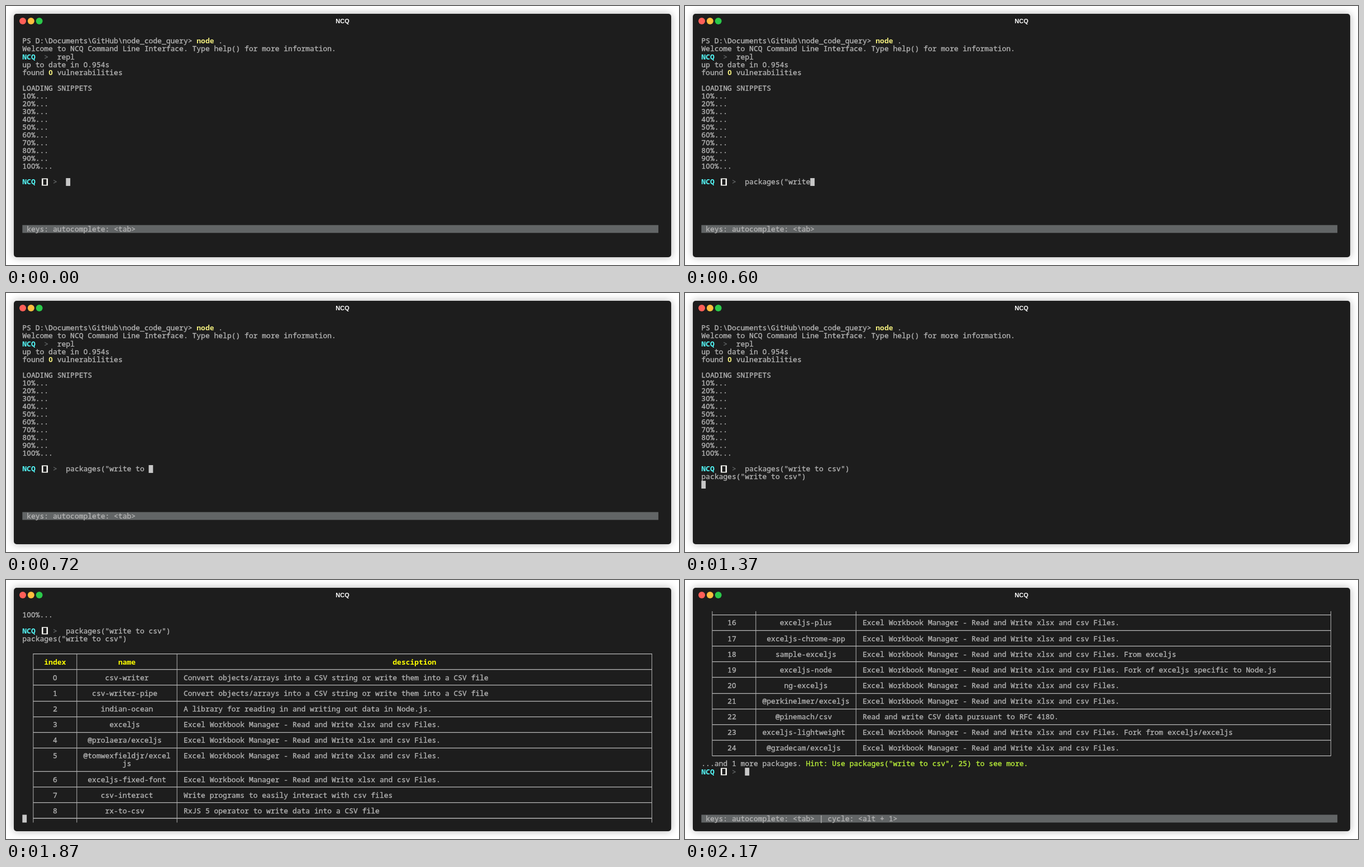
An HTML page with a canvas for the animation above (4.17 s loop, 1205 by 465 pixels).

```html
<!DOCTYPE html>
<html lang="en">
<head>
<meta charset="utf-8">
<title>NCQ</title>
<style>
html, body { margin: 0; width: 100%; height: 100%; overflow: hidden; background: #fff; }
#window {
  position: absolute; left: 14px; top: 14px; width: 1177px; height: 437px;
  border-radius: 5px; background: #1d1d1d; box-shadow: 0 0 14px rgba(0, 0, 0, .3);
}
canvas { position: absolute; left: 0; top: 0; }
</style>
</head>
<body>
<div id="window"></div>
<canvas id="screen" width="1205" height="465"></canvas>
<script>
const ctx = document.getElementById('screen').getContext('2d');
const LOOP = 4170, LEFT = 29.3, TOP = 56, CELL = 7.8, LINE = 14.055, COLS = 146;
const BG = '#1d1d1d', FG = '#b4b4b4', DIM = '#626566', CYAN = '#5ff', PALE = '#f2ee7e',
      YELLOW = '#ff0', GREEN = '#b9f03a', WHITE = '#f9f9f4', CURSOR = '#c7c7c7';
const COMMAND = 'packages("write to csv")';
const EXCEL = 'Excel Workbook Manager - Read and Write xlsx and csv Files.';
const CONVERT = 'Convert objects/arrays into a CSV string or write them into a CSV file';
const BORDERS = [2, 12, 35, 144];

const firstRows = [
  ['csv-writer', CONVERT],
  ['csv-writer-pipe', CONVERT],
  ['indian-ocean', 'A library for reading in and writing out data in Node.js.'],
  ['exceljs', EXCEL],
  ['@prolaera/exceljs', EXCEL],
  ['@tomwexfieldjr/exceljs', EXCEL],
  ['exceljs-fixed-font', EXCEL],
  ['csv-interact', 'Write programs to easily interact with csv files'],
  ['rx-to-csv', 'RxJS 5 operator to write data into a CSV file'],
];
const lastRows = [
  ['exceljs2', EXCEL.replace('Manager', 'Manager (forked)')],
  ['exceljs-rtl', EXCEL],
  ['exceljs-plus', EXCEL],
  ['exceljs-chrome-app', EXCEL],
  ['sample-exceljs', EXCEL + ' From exceljs'],
  ['exceljs-node', EXCEL + ' Fork of exceljs specific to Node.js'],
  ['ng-exceljs', EXCEL],
  ['@perkinelmer/exceljs', EXCEL],
  ['@pinemach/csv', 'Read and write CSV data pursuant to RFC 4180.'],
  ['exceljs-lightweight', EXCEL + ' Fork from exceljs/exceljs'],
  ['@gradecam/exceljs', EXCEL],
];

const colX = col => LEFT + col * CELL;
const rowY = row => TOP + row * LINE;
const ruleY = row => Math.floor(rowY(row) + 6.5);

function text(row, col, string, color = FG, bold = false) {
  ctx.fillStyle = ctx.strokeStyle = color;
  ctx.lineWidth = .35;
  ctx.textAlign = 'center';
  [...string].forEach((char, i) => {
    // The proportional face has a plain zero
    const family = char === '0' ? '"Noto Sans", sans-serif' : '"Noto Sans Mono", monospace';
    const x = colX(col + i + .5), y = Math.round(rowY(row) + 11.4);
    ctx.font = `${bold ? 'bold ' : ''}13px ${family}`;
    ctx.fillText(char, x, y);
    if (!bold) ctx.strokeText(char, x, y); // slightly heavier stems
  });
}

function block(row, col, width, color) {
  ctx.fillStyle = color;
  ctx.fillRect(colX(col), rowY(row), width * CELL, LINE);
}

const cursor = (row, col) => block(row, col, 1, CURSOR);

// The bold brackets touch and read as one closed box
function brackets(row) {
  const y = Math.round(rowY(row));
  ctx.fillStyle = WHITE;
  ctx.fillRect(64, y + .5, 11, 13);
  ctx.fillStyle = BG;
  ctx.fillRect(66.5, y + 2, 6, 10);
}

function prompt(row, input = '') {
  text(row, 0, 'NCQ', CYAN, true);
  brackets(row);
  text(row, 7, '>', DIM);
  text(row, 10, input);
}

function keyBar(row, keys) {
  block(row, 0, COLS, DIM);
  text(row, 0, ' keys: ' + keys);
}

function rule(row) {
  ctx.fillStyle = FG;
  ctx.fillRect(colX(2.5), ruleY(row), 142 * CELL, 1.3);
}

function verticals(top, bottom) {
  ctx.fillStyle = FG;
  for (const col of BORDERS) ctx.fillRect(colX(col + .5) - .5, top, 1, bottom - top);
}

function centered(row, left, width, string, color, bold) {
  text(row, left + Math.floor((width - string.length) / 2), string, color, bold);
}

// Draws table rows with a rule below each; returns the next free row
function tableRows(row, rows, index) {
  for (const [name, description] of rows) {
    centered(row, 3, 9, String(index++));
    text(row, 37, description);
    for (const part of name.match(/.{1,20}/g)) centered(row++, 13, 22, part);
    rule(row++);
  }
  return row;
}

function startScreen(input) {
  text(0, 0, 'PS D:\\Documents\\GitHub\\node_code_query>');
  text(0, 40, 'node', PALE, true);
  text(0, 45, '.');
  text(1, 0, 'Welcome to NCQ Command Line Interface. Type help() for more information.');
  text(2, 0, 'NCQ', CYAN, true);
  text(2, 5, '>', DIM);
  text(2, 8, 'repl');
  text(3, 0, 'up to date in 0.954s');
  text(4, 0, 'found');
  text(4, 6, '0', PALE, true);
  text(4, 8, 'vulnerabilities');
  text(6, 0, 'LOADING SNIPPETS');
  for (let i = 1; i <= 10; i++) text(6 + i, 0, i * 10 + '%...');
  prompt(18, input);
}

function typing(time) {
  const count = Math.max(0, Math.min(COMMAND.length, Math.floor(time / 30) - 5));
  startScreen(COMMAND.slice(0, count));
  cursor(18, 10 + count);
  keyBar(24, 'autocomplete: <tab>');
}

function submitted() {
  startScreen(COMMAND);
  text(19, 0, COMMAND);
  cursor(20, 0);
}

function tableStart() {
  text(0, 0, '100%...');
  prompt(2, COMMAND);
  text(3, 0, COMMAND);
  verticals(ruleY(5), rowY(27));
  rule(5);
  centered(6, 3, 9, 'index', YELLOW, true);
  centered(6, 13, 22, 'name', YELLOW, true);
  centered(6, 36, 108, 'desciption', YELLOW, true);
  rule(7);
  tableRows(8, firstRows, 0);
  rule(26);
  cursor(26, 0);
}

function tableEnd(row, first) {
  const end = tableRows(row, lastRows.slice(first - 14), first);
  verticals(TOP, ruleY(end - 1) + 1);
  text(end, 0, '...and 1 more packages.');
  text(end, 24, 'Hint: Use packages("write to csv", 25) to see more.', GREEN);
  prompt(end + 1);
}

function finished() {
  rule(0);
  tableEnd(1, 16);
  cursor(20, 10);
  keyBar(26, 'autocomplete: <tab> | cycle: <alt + 1>');
}

function titleBar() {
  ['#ff5f58', '#ffbd3e', '#2bc94a'].forEach((color, i) => {
    ctx.fillStyle = color;
    ctx.beginPath();
    ctx.arc(30 + i * 14.8, 27, 6, 0, Math.PI * 2);
    ctx.fill();
  });
  ctx.fillStyle = '#fff';
  ctx.textAlign = 'center';
  ctx.font = 'bold 11px "Liberation Sans", Arial, sans-serif';
  ctx.fillText('NCQ', 602.5, 31);
}

function draw(now) {
  const time = now % LOOP;
  ctx.clearRect(0, 0, 1205, 465);
  titleBar();
  if (time < 1370) typing(time);
  else if (time < 1870) submitted();
  else if (time < 2070) tableStart();
  else if (time < 2170) { tableEnd(0, 14); cursor(26, 0); }
  else finished();
}

let start;
function tick(now) {
  start ??= now;
  draw(now - start);
  requestAnimationFrame(tick);
}
requestAnimationFrame(tick);
</script>
</body>
</html>
```
